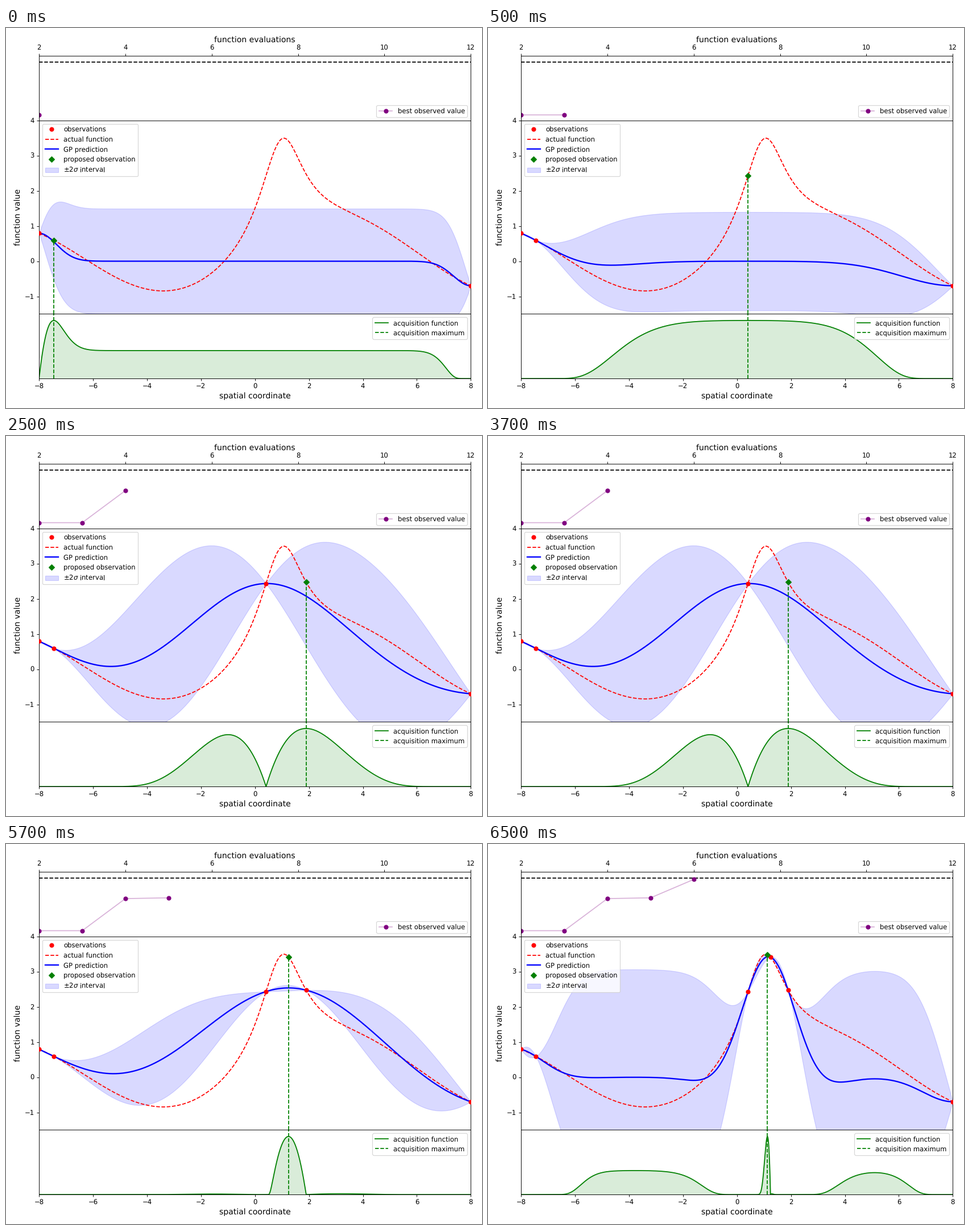
A matplotlib script that plays this animation: 837x669 px, repeating every 8000 ms.

```python
import math

import numpy as np
import matplotlib.pyplot as plt
from matplotlib.animation import FuncAnimation

W, H, DPI = 837, 669, 83.7
LEFT, RIGHT, TOP, BOTTOM = 58.1, 817.3, 49.1, 617.1
ROW = (BOTTOM - TOP) / 5
PURPLE_LINE = (0.5, 0, 0.5, 0.3)
STEPS = 5
FIRST_SCALE = 0.64  # two distant points do not determine a length scale

plt.rcParams["text.hinting"] = "no_hinting"
xs = np.linspace(-8, 8, 8001)


def target(x):
    return np.sin(x / 2) + 3 / (1 + (x - 1) ** 2)


def rbf(a, b, scale):
    return np.exp(-(a[:, None] - b[None, :]) ** 2 / (2 * scale ** 2))


def gram(x, scale):
    return rbf(x, x, scale) + 1e-10 * np.eye(len(x))


def cost(x, y, scale):
    """Negative log likelihood with the signal variance profiled out."""
    k = gram(x, scale)
    return len(x) * math.log(y @ np.linalg.solve(k, y)) + np.linalg.slogdet(k)[1]


def gaussian_process(x, y):
    scale = FIRST_SCALE
    if len(x) > 2:
        scale = min(np.geomspace(0.4, 12, 2000), key=lambda s: cost(x, y, s))
    k, ks = gram(x, scale), rbf(xs, x, scale)
    weights = np.linalg.solve(k, y)
    variance = y @ weights / len(x)
    explained = np.sum(ks * np.linalg.solve(k, ks.T).T, axis=1)
    return ks @ weights, np.sqrt(variance * np.clip(1 - explained, 0, None))


def expected_improvement(mean, sd, best):
    sd = np.maximum(sd, 1e-9)
    z = (mean - best) / sd
    cdf = np.array([0.5 * math.erfc(-v / math.sqrt(2)) for v in z])
    pdf = np.exp(-z ** 2 / 2) / math.sqrt(2 * math.pi)
    return sd * (z * cdf + pdf)


def optimise():
    """Each stage observes the point proposed by the one before."""
    x, stages = np.array([-8.0, 8.0]), []
    for _ in range(STEPS):
        y = target(x)
        mean, sd = gaussian_process(x, y)
        gain = expected_improvement(mean, sd, y.max())
        proposed = xs[gain.argmax()]
        stages.append((x, y, mean, sd, gain / gain.max(), proposed))
        x = np.append(x, proposed)
    return stages


stages = optimise()
best_values = [y.max() for _, y, *_ in stages]

fig = plt.figure(figsize=((W + 0.01) / DPI, (H + 0.01) / DPI), dpi=DPI)


def add_axes(first_row, rows):
    bottom = H - TOP - (first_row + rows) * ROW
    return fig.add_axes([LEFT / W, bottom / H, (RIGHT - LEFT) / W, rows * ROW / H])


# Best value so far
ax_best = add_axes(0, 1)
ax_best.axhline(target(xs).max(), color="black", ls="--")
best_line, = ax_best.plot([], [], "o-", color=PURPLE_LINE, mfc="purple",
                          mec="purple", label="best observed value")
ax_best.set(xlim=(2, 12), ylim=(0.5, 3.8), yticks=[])
ax_best.xaxis.tick_top()
ax_best.xaxis.set_label_position("top")
ax_best.set_xlabel("function evaluations", fontsize=12)
ax_best.legend(handles=[best_line], loc="lower right")

# Model
ax_model = add_axes(1, 3)
dots, = ax_model.plot([], [], "ro", zorder=3, label="observations")
truth, = ax_model.plot(xs, target(xs), "r--", label="actual function")
prediction, = ax_model.plot([], [], "b", lw=2, label="GP prediction")
stem, = ax_model.plot([], [], "g--")
proposal, = ax_model.plot([], [], "gD", zorder=3, label="proposed observation")
ax_model.set(xlim=(-8, 8), ylim=(-1.5, 4), xticks=[], yticks=range(-1, 5))
ax_model.set_ylabel("function value", fontsize=12)

# Acquisition
ax_gain = add_axes(4, 1)
gain_line, = ax_gain.plot([], [], "g", label="acquisition function")
peak_line = ax_gain.axvline(0, color="g", ls="--", label="acquisition maximum")
ax_gain.set(xlim=(-8, 8), ylim=(0, 1 / 0.9), yticks=[])
ax_gain.set_xlabel("spatial coordinate", fontsize=12)
ax_gain.legend(handles=[gain_line, peak_line], loc="upper right")

fills = []


def refill(mean, sd, gain):
    while fills:
        fills.pop().remove()
    fills.append(ax_model.fill_between(xs, mean - 2 * sd, mean + 2 * sd, color="blue",
                                       alpha=0.15, label=r"$\pm 2\sigma$ interval"))
    fills.append(ax_gain.fill_between(xs, 0, gain, color="green", alpha=0.15))


def update(frame):
    step = (frame + 3) // 4
    x, y, mean, sd, gain, proposed = stages[step]
    best_line.set_data(2 + np.arange(step + 1), best_values[:step + 1])
    dots.set_data(x, y)
    prediction.set_data(xs, mean)
    proposal.set_data([proposed], [target(proposed)])
    stem.set_data([proposed, proposed], [-1.5, target(proposed)])
    gain_line.set_data(xs, gain)
    peak_line.set_xdata([proposed, proposed])
    refill(mean, sd, gain)
    return []


update(0)
ax_model.legend(handles=[dots, truth, prediction, proposal, fills[0]], loc="upper left")

anim = FuncAnimation(fig, update, frames=16, interval=500, repeat=True,
                     repeat_delay=0, blit=False)
plt.show()
```
